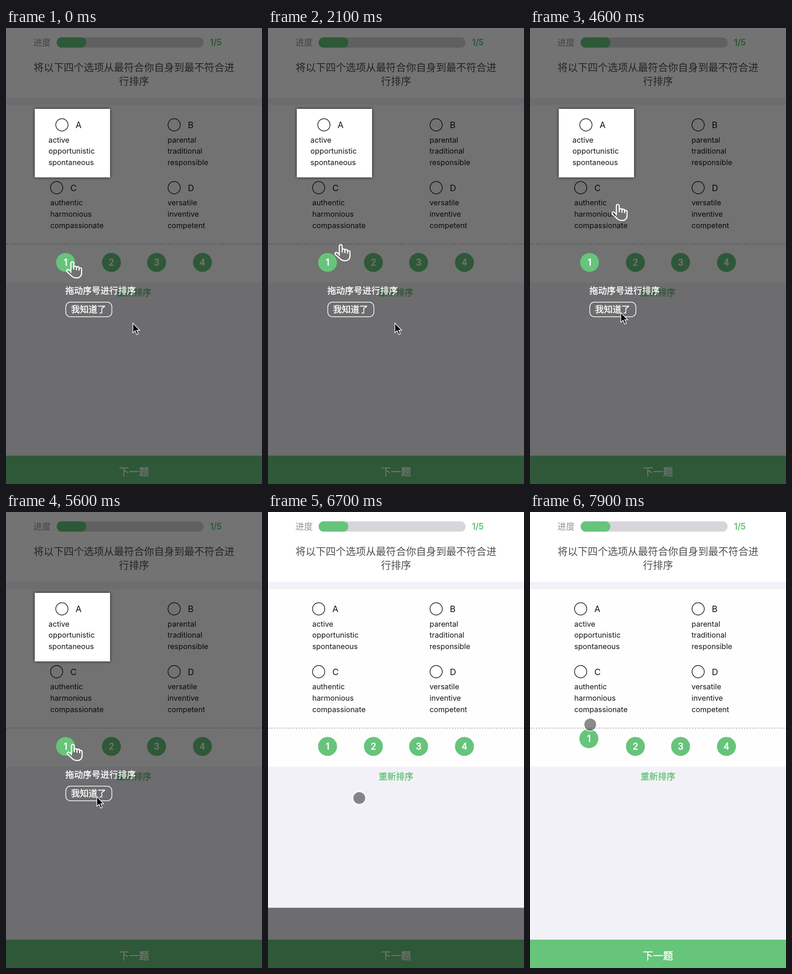
Recreate the animation shown at these times as an HTML page. Size 561 by 998 pixels, loop 8 s.

```html
<!DOCTYPE html>
<html lang="zh-CN">
<head>
<meta charset="utf-8">
<style>
html, body { margin: 0; width: 100%; height: 100%; overflow: hidden; background: #f3f1f8; }
svg { display: block; width: 561px; height: 998px; font-family: Inter, "Noto Sans CJK SC", "Noto Sans CJK JP", sans-serif; }
.card { filter: drop-shadow(0 0 3px rgba(0, 0, 0, .75)); }
.mid { text-anchor: middle; }
.bold { font-weight: 500; stroke: currentColor; stroke-width: .45px; }
</style>
</head>
<body>
<svg id="stage" viewBox="0 0 561 998"></svg>
<script>
const GREEN = '#67c47b';
const LOOP = 8000, STEP = 100;

const rect = (x, y, w, h, fill, more = '') =>
  `<rect x="${x}" y="${y}" width="${w}" height="${h}" fill="${fill}" ${more}/>`;
const text = (x, y, size, color, str, cls = '') =>
  `<text x="${x}" y="${y}" font-size="${size}" color="${color}" fill="${color}" class="${cls}">${str}</text>`;

// One answer: a radio ring, its letter and three words
const option = (ringX, wordX, y, letter, words) =>
  `<circle cx="${ringX}" cy="${y}" r="13.4" fill="none" stroke="#1e1c22" stroke-width="1.5"/>` +
  text(ringX + 30, y + 7, 19, '#151515', letter) +
  words.split(' ').map((w, i) => text(wordX, y + 38.5 + i * 24.8, 16.3, '#151515', w)).join('');

const badge = (x, n, id = '') =>
  `<g id="${id}"><circle cx="${x}" cy="513" r="20.8" fill="${GREEN}"/>` +
  text(x, 520, 19.5, '#fff', n, 'mid bold') + '</g>';

const WORDS_A = 'active opportunistic spontaneous';

const page =
  rect(0, 0, 561, 998, '#f3f1f8') +
  rect(0, 0, 561, 153, '#fff') +
  rect(0, 169, 561, 388, '#fefefe') +
  text(60, 38.5, 19, '#929292', '进度') +
  rect(111, 20.5, 322, 22.5, '#d7d5d9', 'rx="11.2"') +
  rect(111, 20.5, 65, 22.5, GREEN, 'rx="11.2"') +
  text(447, 38.3, 18.5, GREEN, '1/5', 'bold') +
  text(280.5, 94, 22, '#505050', '将以下四个选项从最符合你自身到最不符合进', 'mid') +
  text(280.5, 124, 22, '#505050', '行排序', 'mid') +
  option(111, 97, 212, 'A', WORDS_A) +
  option(368.5, 354, 212, 'B', 'parental traditional responsible') +
  option(111, 97, 349.5, 'C', 'authentic harmonious compassionate') +
  option(368.5, 354, 349.5, 'D', 'versatile inventive competent') +
  '<path d="M2.5 473H561" stroke="#c0bec4" stroke-width="3" stroke-linecap="round" stroke-dasharray="0 6"/>' +
  badge(231, 2) + badge(330, 3) + badge(430.5, 4) + badge(130.5, 1, 'first') +
  text(280.5, 586, 19, GREEN, '重新排序', 'mid bold') +
  rect(0, 936, 561, 62, GREEN) +
  text(280.5, 979, 22, '#fff', '下一题', 'mid bold');

const guide =
  rect(0, -6, 561, 1010, '#000', 'opacity=".55"') +
  rect(63, 177, 165, 150, '#fff', 'class="card"') +
  option(122.5, 93, 212, 'A', WORDS_A) +
  badge(130.5, 1) +
  text(130, 581.5, 19.3, '#fff', '拖动序号进行排序', 'bold') +
  rect(131, 600, 101, 32, 'none', 'rx="10" stroke="#fff" stroke-width="1.5"') +
  text(181, 623, 19.3, '#fff', '我知道了', 'mid bold') +
  `<path id="hand" fill="none" stroke="#fff" stroke-width="2.4" stroke-linecap="round" stroke-linejoin="round"
    d="M11 25V5a3.2 3.2 0 0 1 6.4 0V18M17.4 14a2.9 2.9 0 0 1 5.8 0V19M23.2 15a2.9 2.9 0 0 1 5.8 0V20
    M29 17a2.9 2.9 0 0 1 5.6 0V26C34.6 33 30 37 23.5 37 17 37 14 34 11 31L2.5 23.5C0 20 4 17 7 19.5L11 23"/>`;

const pointers =
  '<path id="arrow" d="M0 0V21L5 16.5 8.5 25 12 23.5 8.5 15.5H15Z" stroke="#fff" stroke-width="1.4"/>' +
  '<g id="touch"><circle r="13" opacity=".45"/>' +
  '<circle r="14.5" fill="none" stroke="#fff" stroke-width="3" opacity=".5"/></g>';

const $ = id => document.getElementById(id);
$('stage').innerHTML = page + `<g id="guide">${guide}</g>` + pointers;

const move = (id, x, y) => $(id).setAttribute('transform', `translate(${x} ${y})`);
const show = (id, on) => $(id).setAttribute('visibility', on ? 'visible' : 'hidden');
const part = (t, from, to) => Math.min(1, Math.max(0, (t - from) / (to - from)));
const swing = p => (1 - Math.cos(Math.PI * p)) / 2;
const easeOut = p => Math.sin(Math.PI / 2 * p);
const mix = (a, b, p) => a + (b - a) * p;

function draw(t) {
  const clicked = t >= 6400;

  // The hand repeats its drag until the guide is dismissed
  const lift = clicked ? 0 : easeOut((t / 1860 + .01) % 1);
  move('hand', 130 + 70 * lift, 513 - 187 * lift);

  const slide = swing(part(t, 6364, 6801));
  move('guide', 0, 1004 * slide - 6 * slide);
  show('guide', slide < 1);

  const aim = swing(part(t, 2200, 2900));
  move('arrow', mix(278, 199, aim), mix(646, 623, aim));
  show('arrow', !clicked);

  const reach = swing(part(t, 6750, 7200)), drag = part(t, 7600, 7900);
  move('touch', mix(200, 134, reach) - 2 * drag, mix(626, 512, reach) - 47 * drag);
  show('touch', clicked);

  const follow = part(t, 7700, 7900);
  move('first', -1.5 * follow, -17 * follow);
}

const start = performance.now();
function tick() {
  const t = (performance.now() - start) % LOOP;
  draw(Math.floor(t / STEP) * STEP);
  requestAnimationFrame(tick);
}
tick();
</script>
</body>
</html>
```
